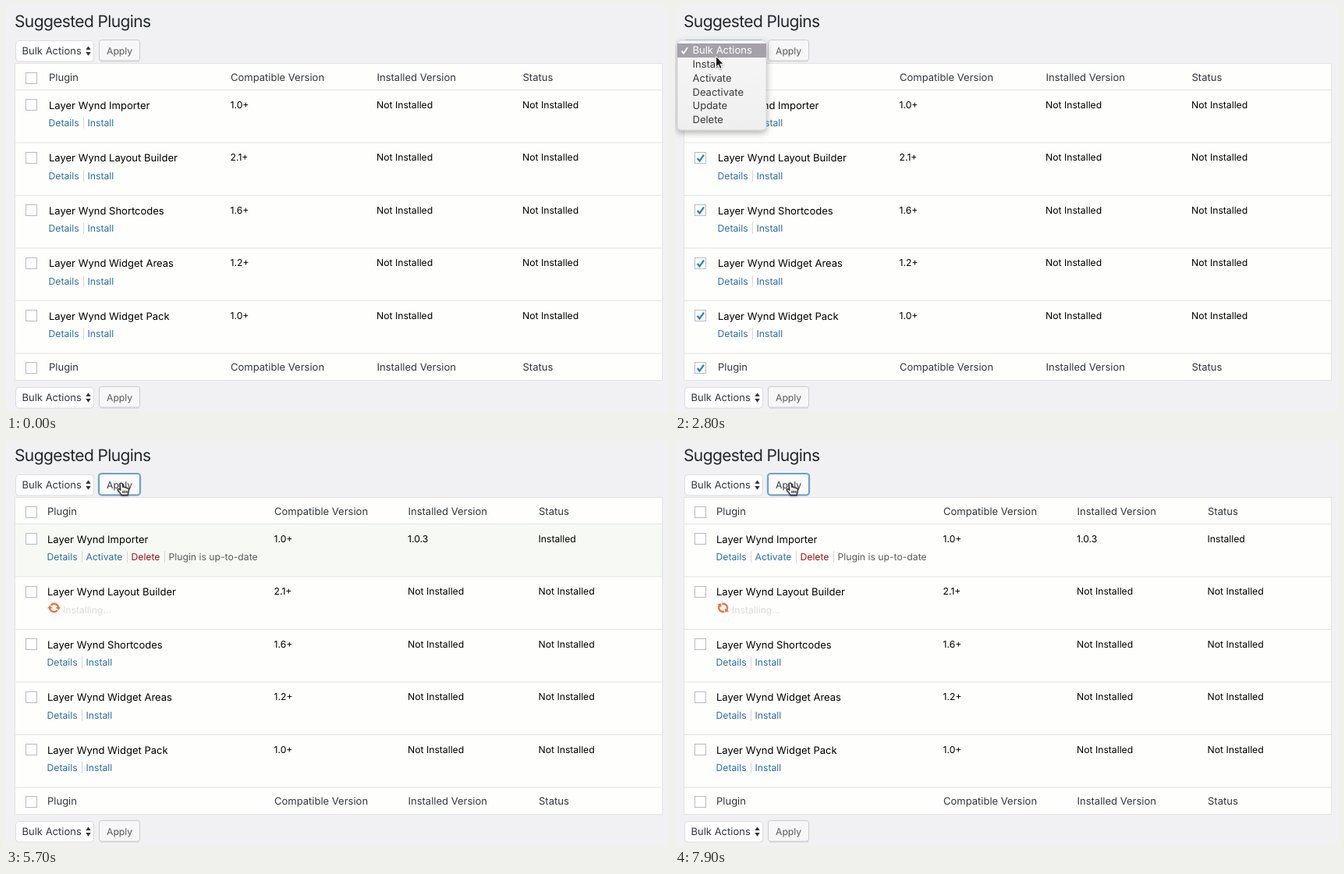
Write an HTML page that moves like this. It is 850x520 px and loops after 8 s.

```html
<!DOCTYPE html>
<html lang="en">
<head>
<meta charset="utf-8">
<title>Suggested Plugins</title>
<style>
html, body { margin: 0; width: 100%; height: 100%; overflow: hidden; background: #f1f1f3; }
svg { display: block; font: 13px Inter, sans-serif; font-optical-sizing: none; text-rendering: geometricPrecision; }
.title { font-size: 21px; letter-spacing: -.62px; fill: #23282d; }
.small { font-size: 12.2px; }
.head { fill: #32373c; }
.link { fill: #2a6ea4; }
.sep { fill: #d5d5d5; }
.del { fill: #a01010; }
.note { fill: #5a5a5a; }
.busy { fill: #dcdce2; }
.line { stroke: #e3e3e5; }
.box { fill: #fff; stroke: #b8bcc1; }
.tick { fill: none; stroke: #2786bd; stroke-width: 2.3; }
</style>
</head>
<body>
<svg width="850" height="520" viewBox="0 0 850 520">
  <defs>
    <filter id="shade" x="-20%" y="-20%" width="140%" height="150%">
      <feDropShadow dx="0" dy="3" stdDeviation="4" flood-opacity=".32"/>
    </filter>
    <filter id="soft" x="-50%" y="-50%" width="200%" height="200%">
      <feDropShadow dx="0" dy="1" stdDeviation=".8" flood-opacity=".35"/>
    </filter>
    <linearGradient id="paper" x2="0" y2="1">
      <stop offset="0" stop-color="#f7f7f7"/><stop offset="1" stop-color="#efefef"/>
    </linearGradient>
    <path id="arc" d="M.2-6.7C3.7-6.7 6.6-4.1 7.1-.7H9.2L5.7 3.3 2.2-.7H4.5C4.1-2.7 2.3-4.2.2-4.2-1.25-4.2-2.5-3.5-3.3-2.4L-5.05-4.3C-3.8-5.8-1.9-6.7.2-6.7Z"/>
  </defs>
  <rect x="11.5" y="73.5" width="830" height="406" fill="#fefefd" stroke="#e3e3e5"/>
  <rect id="glow" x="12" y="108" width="829" height="67" fill="#f5f9f3"/>
  <text class="title" x="11" y="27">Suggested Plugins</text>
  <g id="page"></g>
  <g id="menu"></g>
  <g id="arrow" filter="url(#soft)">
    <path d="M.5 .5V14.2L3.5 11.4 5.8 16.4 8.2 15.3 5.9 10.4H10.2Z" fill="#1a1a1a" stroke="#fff"/>
  </g>
  <g id="hand" filter="url(#soft)" stroke="#2a2a2a" stroke-width="1.3" stroke-linejoin="round">
    <path d="M-2 1.6C-2-.4 1-.4 1.3 1.6L2 5.4C3 4.6 4.4 5 4.6 6 5.6 5.3 7 5.8 7.2 6.8 8.4 6.3 9.4 7 9.4 8.2 9.4 11 8.6 12.5 8 15.5H0C-1 13-3 11.5-4.5 9.5-5.5 8-3.8 7-2.6 8L-1.2 9.3Z" fill="#f0f0f0"/>
    <path d="M2 10V13M4.4 10V13M6.8 10V13" fill="none"/>
  </g>
</svg>
<script>
const LOOP = 8000, TICK = 100, ROW = 67.5;
const OPEN = 2400, PICKED = 3700, SENT = 4500, DONE = 5400;
const plugins = [['Importer', '1.0+'], ['Layout Builder', '2.1+'], ['Shortcodes', '1.6+'],
  ['Widget Areas', '1.2+'], ['Widget Pack', '1.0+']];
const actions = ['Bulk Actions', 'Install', 'Activate', 'Deactivate', 'Update', 'Delete'];
// time, x, y of the pointer tip
const track = [[300, 437, 503], [400, 187, 281], [600, 187, 281], [700, 165, 254], [800, 125, 205],
  [900, 85, 158], [1000, 58, 126], [1100, 42, 107], [1200, 37, 100], [1400, 32, 93], [1800, 32, 93],
  [1900, 38, 84], [2100, 52, 60], [2700, 52, 60], [3000, 52, 72], [3700, 52, 72], [3800, 62, 70],
  [4000, 115, 60], [4100, 138, 57], [4200, 145, 55], [4300, 148, 55], [LOOP, 148, 55]];

const $ = id => document.getElementById(id);
const text = (x, y, s, cls = '') => `<text x="${x}" y="${y}" class="${cls}">${s}</text>`;
const small = (x, y, s, cls = '') => text(x, y, s, 'small ' + cls);
const clamp = v => Math.max(0, Math.min(1, v));

function checkbox(y, on) {
  return `<rect class="box" x="25.5" y="${y - 7}" width="14" height="14"/>` +
    (on ? `<path class="tick" d="M28.6 ${y + .4}l3 3.4 5.4-7.6"/>` : '');
}

function toolbar(y, label, selectOn, buttonOn) {
  const halo = (x, w, top, color) => `<rect x="${x}" y="${top}" width="${w}" height="28" rx="4" fill="none" stroke="${color}" stroke-opacity=".55" stroke-width="1.8"/>`;
  return (selectOn ? halo(12, 101, y + .5, '#5b9dd9') : '') +
    `<rect x="12.5" y="${y + 1}" width="100" height="26.5" rx="4" fill="#fff" stroke="${selectOn ? '#5b9dd9' : '#dcdcde'}"/>` +
    text(20.5, y + 18.7, label, 'head') +
    `<path d="M102.3 ${y + 12.6}l3.2-4.6 3.2 4.6zm0 3l3.2 4.6 3.2-4.6z" fill="#333"/>` +
    (buttonOn ? halo(118.7, 53.6, y - .7, '#2f6f9c') : `<path d="M121 ${y + 27.5}h50" stroke="#d2d2d4"/>`) +
    `<rect x="119.5" y="${y}" width="52" height="26.5" rx="3" fill="${buttonOn ? '#fafafa' : '#f7f7f7'}" stroke="${buttonOn ? '#5b95c4' : '#cbcbcd'}"/>` +
    small(129, y + 18, 'Apply', buttonOn ? 'head' : 'note');
}

function links(x, y, parts) {
  return parts.map(([dx, s, cls]) => small(x + dx, y, s, cls)).join('');
}

function spinner(x, y) {
  return `<g id="spin" data-at="${x + 8.7} ${y - 6.6}" fill="#ee7440"><use href="#arc"/><use href="#arc" transform="rotate(180)"/></g>` +
    small(x + 20, y, 'Installing...', 'busy');
}

function page({ checked, sent, done, focus, label }) {
  const cols = done ? [53, 344, 515.5, 683] : [55, 288, 475.5, 662.5];
  const x = cols[0];
  const heads = ['Plugin', 'Compatible Version', 'Installed Version', 'Status'];
  const headRow = y => checkbox(y, checked) + heads.map((h, i) => text(cols[i], y + 3.7, h, 'head')).join('');
  const idle = [[0, 'Details', 'link'], [43, '|', 'sep'], [50, 'Install', 'link']];
  const ready = [[0, 'Details', 'link'], [43, '|', 'sep'], [50, 'Activate', 'link'], [101, '|', 'sep'],
    [108, 'Delete', 'del'], [149, '|', 'sep'], [156, 'Plugin is up-to-date', 'note']];
  let out = toolbar(43.5, label, focus, sent) + toolbar(487.5, 'Bulk Actions') + headRow(92.5) + headRow(463.5);
  for (let i = 0; i <= 5; i++) {
    out += `<path class="line" d="M12 ${107.5 + i * ROW}H841"/>`;
  }
  plugins.forEach(([name, version], i) => {
    const y = i * ROW, installed = done && i === 0;
    const busy = sent && i === (done ? 1 : 0);
    out += checkbox(Math.ceil(y) + 126.5, checked) +
      text(x, y + 131.5, 'Layer Wynd ' + name) +
      small(cols[1] - .5, y + 130.5, version) +
      small(cols[2] - .5, y + 130.5, installed ? '1.0.3' : 'Not Installed') +
      small(cols[3] - .5, y + 130.5, installed ? 'Installed' : 'Not Installed') +
      (busy ? spinner(x, y + 154) : links(x - .5, y + 154, installed ? ready : idle));
  });
  return out;
}

function menu(active) {
  return '<rect x="3" y="44" width="114" height="115" rx="5" fill="url(#paper)" stroke="#c4c4c6" stroke-width=".6" filter="url(#shade)"/>' +
    actions.map((s, i) => {
      const y = 48 + i * 17.75, on = i === active;
      return (on ? `<rect x="3" y="${y}" width="114" height="18" fill="#a4a1a8"/>` : '') +
        `<text x="22.5" y="${y + 13.4}" fill="${on ? '#fff' : '#3a3a3a'}">${s}</text>`;
    }).join('') +
    `<path d="M8.5 57.5l2.5 3.3 5-7.6" fill="none" stroke="${active === 0 ? '#fff' : '#3a3a3a'}" stroke-width="1.7"/>`;
}

function pointer(t) {
  const i = track.findIndex(p => p[0] > t);
  if (i < 1) return null;
  const [t0, x0, y0] = track[i - 1], [t1, x1, y1] = track[i];
  const k = (t - t0) / (t1 - t0);
  return [x0 + (x1 - x0) * k, y0 + (y1 - y0) * k];
}

const drawn = {};
function fill(id, make, arg) {
  const key = JSON.stringify(arg);
  if (drawn[id] === key) return;
  drawn[id] = key;
  $(id).innerHTML = make(arg);
}

function render(t) {
  const sent = t >= SENT, done = t >= DONE;
  fill('page', page, {
    checked: t >= 1700 && !sent, sent, done,
    focus: t >= OPEN && !sent,
    label: t >= PICKED && !sent ? 'Install' : 'Bulk Actions'
  });

  // the chosen item blinks once before the menu fades
  fill('menu', menu, t === 3300 ? -1 : t >= 3000 ? 1 : 0);
  $('menu').setAttribute('opacity', t < OPEN ? 0 : t < 3500 ? 1 : t === 3500 ? .5 : t === 3600 ? .04 : 0);

  $('glow').setAttribute('opacity', Math.min(clamp((t - DONE + TICK) / 500), clamp((7100 - t) / 800)));

  const spin = $('spin');
  if (spin) {
    const angle = (t - (done ? 5700 : SENT)) * .18;
    spin.setAttribute('transform', `translate(${spin.dataset.at}) rotate(${angle}) scale(.95)`);
  }

  const at = pointer(t), over = at && t >= 4000;
  $('arrow').setAttribute('visibility', at && !over ? 'visible' : 'hidden');
  $('hand').setAttribute('visibility', over ? 'visible' : 'hidden');
  if (at) $(over ? 'hand' : 'arrow').setAttribute('transform', `translate(${at})`);
}

const start = performance.now();
function frame() {
  const t = (performance.now() - start) % LOOP;
  render(Math.floor(t / TICK) * TICK);
  requestAnimationFrame(frame);
}
frame();
</script>
</body>
</html>
```
